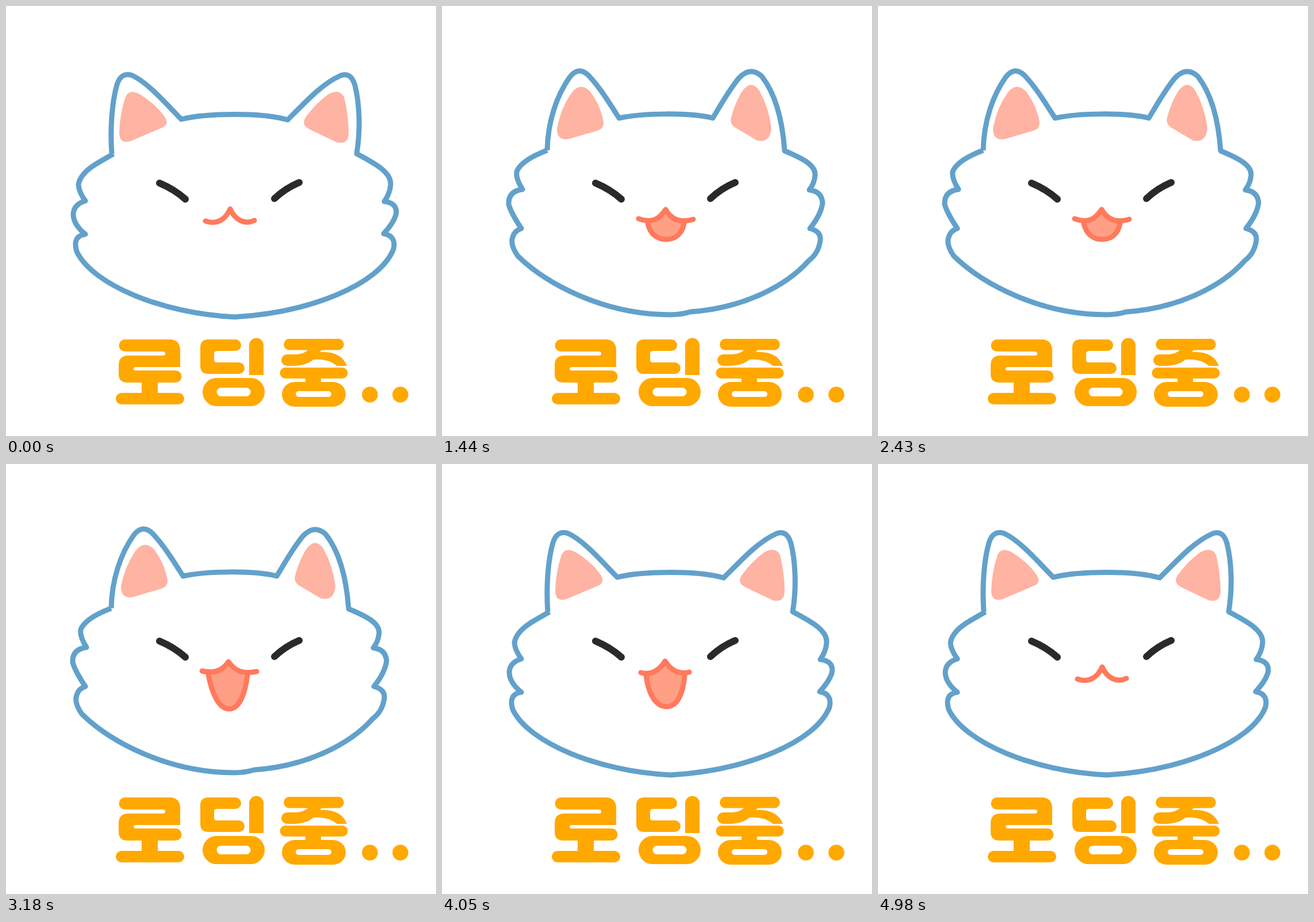
An HTML page that plays this animation: 748x748 px, repeating every 5.01 s.

```html
<!DOCTYPE html>
<html lang="ko">
<head>
<meta charset="utf-8">
<title>로딩중</title>
<style>
  html, body { margin: 0; width: 100%; height: 100%; overflow: hidden; background: #fff; }
  svg { display: block; width: 100%; height: 100%; }
  .outline { fill: #fff; stroke: #62a1cb; stroke-width: 9; }
  .ear { fill: #ffb3a2; }
  .line { fill: none; stroke-linecap: round; }
  .eye { stroke: #2b2a28; stroke-width: 12; }
  .lip { stroke: #ff7a5c; stroke-width: 9; }
  .tongue { fill: #ff9f86; }
  .lettering { fill: #ffa800; fill-rule: evenodd; }
  .label { font: 900 130px "Noto Sans CJK KR", "Noto Sans CJK", sans-serif; fill: transparent; }
  path { stroke-linejoin: round; }
</style>
</head>
<body>
<svg viewBox="0 0 748 748">
  <path id="outline" class="outline"/>
  <path id="ears" class="ear"/>
  <path class="line eye" d="M267 308Q293 319 312 336M510 307Q486 317 467 335"/>
  <path id="tongue" class="tongue"/>
  <path id="jaw" class="line lip"/>
  <path id="lip" class="line lip"/>

  <!-- custom lettering, with selectable text over it -->
  <g class="lettering" aria-hidden="true">
    <path d="M207 580H284Q303 580 303 599V628H226Q222 628 222 631Q222 634 226 634H295a10.5 10.5 0 0 1 0 21H264V673H300a10 10 0 0 1 0 20H201a10 10 0 0 1 0-20H236V655H211Q196 655 196 640V625Q196 608 213 608H273Q277 608 277 604.5Q277 601 273 601H207a10.5 10.5 0 0 1 0-21Z"/>
    <path d="M352 580H399a10 10 0 0 1 0 20H367Q362 600 362 605V616Q362 620 367 620H405a10 10 0 0 1 0 20H352Q338 640 338 626V594Q338 580 352 580Z"/>
    <path d="M423 642V590a12.5 12.5 0 0 1 25 0V642Z"/>
    <path d="M366 647H426a24 24.5 0 0 1 0 49H366a24 24.5 0 0 1 0-49ZM374 664a7.5 7.5 0 0 0 0 15H418a7.5 7.5 0 0 0 0-15Z"/>
    <path d="M491 579H580a10 10 0 0 1 0 19.5H549L546 602Q583 600 593 626H576Q560 613 535 615Q522 626 500 626H489a10 10 0 0 1 0-20H502Q518 606 525 598.5H491a10 10 0 0 1 0-19.5Z"/>
    <path d="M486 629H585a9.5 9.5 0 0 1 0 19H548V654H569a22 21.5 0 0 1 0 43H502a22 21.5 0 0 1 0-43H521V648H486a9.5 9.5 0 0 1 0-19ZM509 670a5 5 0 0 0 0 10H561a5 5 0 0 0 0-10Z"/>
    <circle cx="633" cy="676" r="13.8"/>
    <circle cx="686" cy="676" r="13.8"/>
  </g>
  <text class="label" x="191" y="692">로딩중..</text>
</svg>
<script>
const LOOP = 5010;

const wide = {
  outline: `M184 257C181 215 184 168 193 137Q200 114 220 121C248 134 280 172 305 197
    C350 186 445 185 490 198C522 166 550 135 582 121Q600 114 607 138C615 170 617 215 610 257
    C640 273 671 289 669 311Q668 326 658 340C676 342 681 352 678 364Q673 379 657 396
    C674 399 677 410 674 423C650 484 530 533 398 541C270 535 150 484 123 427
    Q115 400 138 397Q117 380 117 362Q118 345 138 339Q127 324 126 311Q129 290 163 271L187 257`,
  ears: `M208 158Q214 144 232 153Q260 170 276 193Q284 205 273 211L217 235Q197 241 197 220Q198 187 208 158Z
    M560 154Q580 143 588 158Q596 190 596 222Q595 242 575 237L527 214Q513 206 521 194Q538 170 560 154Z`,
  closed: { lip: 'M347 374C365 381 381 373 390 353C398 372 415 381 432 373' },
  open: {
    lip: 'M346 363C365 368 378 359 388 343C398 359 413 367 430 362',
    jaw: 'M355 368C360 405 374 422 391 422C408 422 419 403 422 368',
    cusp: 'L388 343'
  }
};

const narrow = {
  outline: `M183 251C184 200 200 155 222 124Q238 103 256 122C275 142 292 170 308 195
    C350 186 430 185 471 195C485 172 500 145 516 126Q536 104 556 122C578 150 592 195 596 252
    C625 264 650 276 649 294Q648 308 639 320Q660 322 662 342Q660 362 640 387
    Q660 392 658 408Q655 430 638 443C598 488 522 526 432 532Q415 537 397 537
    C280 537 180 482 132 435Q118 415 123 402Q126 391 138 387Q120 360 116 345
    Q115 322 140 319Q128 300 130 288Q138 268 183 251`,
  ears: `M224 153Q240 130 258 149Q277 175 281 202Q282 213 270 217L222 231Q200 236 200 213Q206 180 224 153Z
    M521 150Q537 126 552 147Q569 178 573 212Q571 239 548 234L511 212Q500 206 503 194Q509 170 521 150Z`,
  closed: {
    lip: 'M342 370C365 378 377 372 389 354C399 372 415 378 437 371',
    jaw: 'M358 378C362 398 376 406 390 406C406 406 418 396 421 378',
    cusp: 'L389 354'
  },
  open: {
    lip: 'M341 360C362 365 377 360 387 344C398 360 412 366 436 361',
    jaw: 'M352 366C358 400 371 426 388 426C406 426 416 400 420 366',
    cusp: 'L387 344'
  }
};

const draw = (id, d = '') => document.getElementById(id).setAttribute('d', d);

// True while the phase of a repeating cycle lies between two fractions.
function within(time, period, from, to) {
  const phase = time / period % 1;
  return phase >= from && phase < to;
}

function render(time) {
  const head = within(time, 372, 0.39, 0.885) ? narrow : wide;
  const mouth = within(time, 489, 0.28, 0.8) ? head.open : head.closed;
  draw('outline', head.outline);
  draw('ears', head.ears);
  draw('lip', mouth.lip);
  draw('jaw', mouth.jaw);
  draw('tongue', mouth.jaw && mouth.jaw + mouth.cusp + 'Z');
}

const start = performance.now();
function tick() {
  render((performance.now() - start) % LOOP);
  requestAnimationFrame(tick);
}
tick();
</script>
</body>
</html>
```
